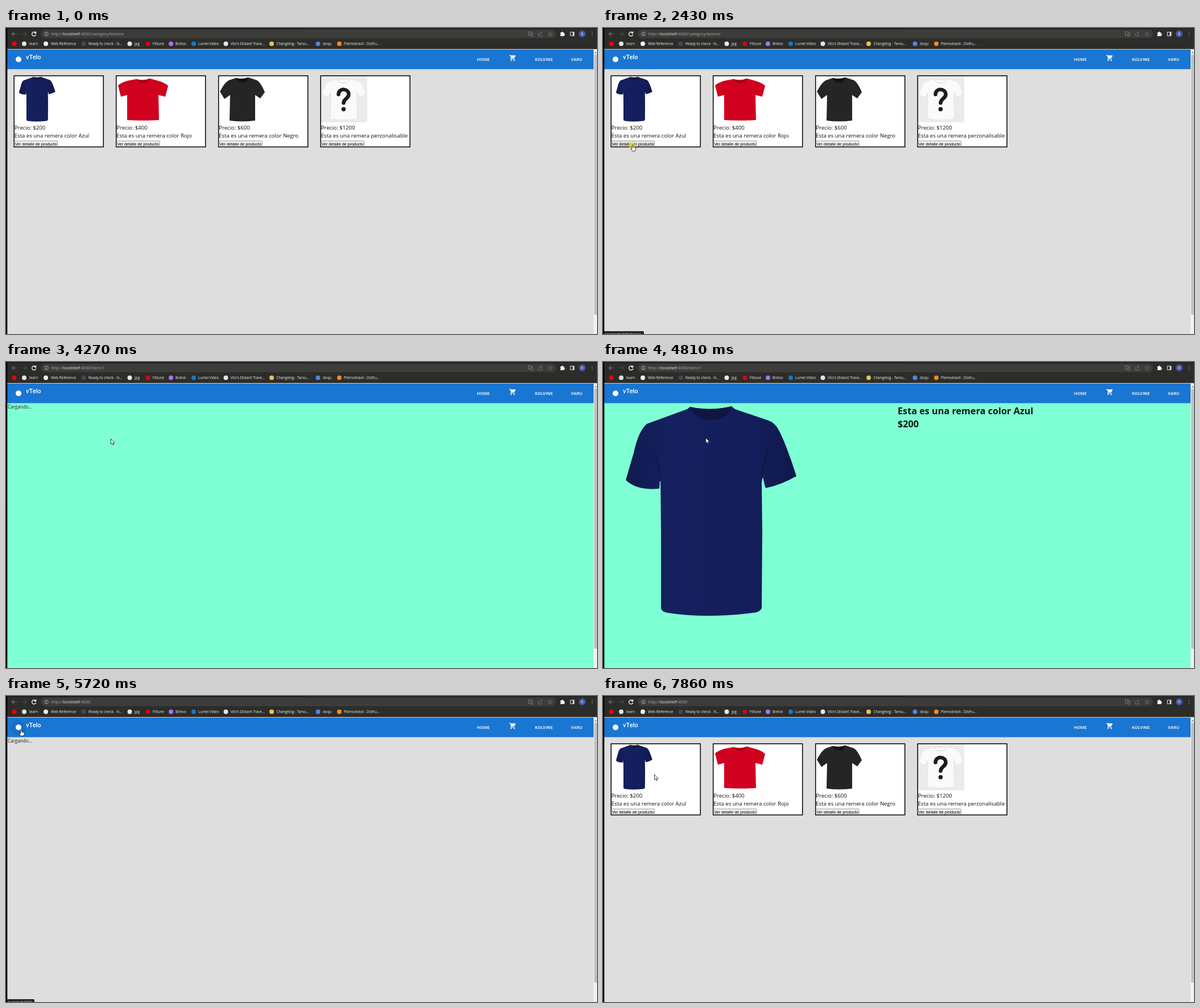
These frames come from a looping animation (1039 by 539 pixels, 8 s). An HTML page:

```html
<!DOCTYPE html>
<html lang="es">
<head>
<meta charset="utf-8">
<title>Tienda</title>
<style>
html, body { margin: 0; width: 100%; height: 100%; overflow: hidden; background: #000; }
svg { display: block; width: 1039px; height: 539px; }
text { font-family: "Open Sans", "Noto Sans", sans-serif; white-space: pre; }
.bar { font-size: 6.3px; fill: #f2f2f2; }
.url { font-size: 7.25px; fill: #a8a8a8; }
.url .host { fill: #f0f0f0; }
.nav { font: 500 7.6px Roboto, sans-serif; letter-spacing: .2px; fill: #fff; }
.brand { font: 500 11px Roboto, sans-serif; fill: #fff; }
.body { font-size: 9.55px; fill: #111; }
.loading { font-size: 8.1px; fill: #222; }
.title { font-size: 16.24px; font-weight: 700; fill: #0b1512; }
.button { font: 7.2px "Liberation Sans", Arial, sans-serif; fill: #000; }
.line { fill: none; stroke-width: 1.1; }
</style>
</head>
<body>
<svg viewBox="0 0 1039 539">
  <defs>
    <linearGradient id="navy" x2="1">
      <stop offset="0" stop-color="#111a50"/><stop offset=".25" stop-color="#15205f"/>
      <stop offset=".75" stop-color="#141e5b"/><stop offset="1" stop-color="#101849"/>
    </linearGradient>
    <g id="blueShirt">
      <path fill="url(#navy)" d="M153 79Q190 87 226 78L232 83L288 102Q302 106 309 120Q321 142 340 201Q312 217 286 222Q283 215 281 200L279 212L280 300L279 434Q276 441 262 442Q180 452 115 442Q101 440 102 432L102 300L101 195L99 223Q60 227 40 208L54 160Q62 122 77 109L148 83Z"/>
      <path fill="#0f1642" d="M153 79Q190 87 226 78Q220 102 190 102Q161 102 153 79Z"/>
      <path d="M91 163Q98 178 101 210M290 150Q283 170 280 205" fill="none" stroke="#0e1545" stroke-width="2"/>
    </g>
  </defs>

  <rect id="page" x="2" y="38" width="1031" height="501"/>
  <g id="shop"></g>
  <g id="detail">
    <use href="#blueShirt"/>
    <text class="title" x="518" y="91.5">Esta es una remera color Azul</text>
    <text class="title" x="518" y="115">$200</text>
  </g>
  <text id="loading" class="loading" x="3" y="82">Cargando...</text>

  <rect x="2" y="38" width="1031" height="34.5" fill="#1976d2"/>
  <circle id="brandHover" cx="22" cy="55" r="13" fill="#000" opacity=".06"/>
  <circle cx="22" cy="55.3" r="5" fill="#fff"/>
  <text class="brand" x="35" y="54.8">vTelo</text>
  <text class="nav" x="828" y="57.6">HOME</text>
  <path fill="#fff" transform="translate(884.3 46.4) scale(.54)" d="M1 2v2h2l3.6 7.6-1.4 2.4c-.7 1.4.3 3 1.8 3h12v-2H7.4l1.1-2H16l1.7-1 4-7.5-1-1H5.2l-1-2zM7 18a2 2 0 100 4 2 2 0 000-4zM17 18a2 2 0 100 4 2 2 0 000-4z"/>
  <text class="nav" x="930" y="57.6">KOLVINE</text>
  <text class="nav" x="993" y="57.6">VARU</text>

  <rect x="1033" y="38" width="6" height="501" fill="#f1f1f1"/>
  <rect x="1034" y="47" width="5" height="458" fill="#c1c1c1"/>
  <path d="M1034.5 44.5h4l-2-2.5z" fill="#777"/>

  <rect width="1039" height="37" fill="#2c2c2a"/>
  <rect width="1039" height="1" fill="#0b0b0b"/>
  <rect x="528" width="511" height="1" fill="#1c1c1c"/>
  <rect y="37" width="1039" height="1" fill="#c9d3de"/>
  <rect x="61" y="3" width="906" height="15" rx="7.5" fill="#3c3c3a"/>
  <g class="line" stroke="#777">
    <path d="M18.5 10.5h-8m3.7-3.7l-3.7 3.7 3.7 3.7"/>
    <path stroke="#4d4d4b" d="M28 10.5h8m-3.7-3.7l3.7 3.7-3.7 3.7"/>
    <path stroke="#fff" stroke-width="1.3" d="M52 8.3A3.6 3.6 0 1 0 52.7 11.5M52.6 6.3V9H49.7"/>
    <circle cx="71" cy="10.5" r="3.4" stroke="#bbb" stroke-width=".8"/>
    <path stroke="#bbb" d="M71 9.9v2.6M71 8.2v1"/>
    <path d="M918.5 6.7h4.5v6h-4.5zM923 8.7h3v5.5h-4"/>
    <path d="M936 9v5h6v-2.5M937.5 11q.5-3 4.5-3m-1.8-2l2.2 2-2.2 2" stroke-width=".9"/>
    <path d="M956.5 6.8l1.1 2.5 2.7.3-2 1.8.6 2.7-2.4-1.4-2.4 1.4.6-2.7-2-1.8 2.7-.3z" stroke-width=".8"/>
    <path d="M992.3 7.2h6.4v6.6h-6.4z" stroke="#ddd"/>
  </g>
  <path d="M974.5 8h2a1.4 1.4 0 0 1 2.8 0h2v2.2a1.4 1.4 0 0 1 0 2.8v1.3h-6.8v-2a1.4 1.4 0 0 0 0-2.6z" fill="#fff"/>
  <path d="M996.3 7h2.5v7h-2.5z" fill="#ddd"/>
  <circle cx="1013" cy="10.3" r="6" fill="#4757ae"/>
  <text x="1013" y="12.6" text-anchor="middle" font-size="6.2" fill="#fff">R</text>
  <path d="M1030.5 7.5v.1m0 2.8v.1m0 2.8v.1" stroke="#aaa" stroke-width="1.3" stroke-linecap="round"/>
  <text class="url" x="79.3" y="13">http://<tspan class="host">toolshelf</tspan>:4000<tspan id="route"></tspan></text>
  <g id="bookmarks"></g>

  <rect width="2.3" height="539" fill="#000"/>
  <g id="status">
    <path id="statusBox" fill="#242424"/>
    <text id="statusText" x="4" y="541.5" font-size="6.3" fill="#ddd"></text>
  </g>

  <circle id="click" r="6.3" fill="#e8dc28" opacity=".65"/>
  <g id="cursor" stroke="#111" stroke-width=".8" stroke-linejoin="round" fill="#fff">
    <path id="arrow" d="M0 0V9.2L2.1 7.3 3.5 10.5 5 9.9 3.6 6.8H6.4Z"/>
    <path id="hand" d="M-1 1Q0-.7 1 1V4.4Q2.2 3.7 2.7 4.9 4 4.3 4.3 5.3 5.6 5 5.5 6.4V8.3L4.3 11.3H-.3L-3 7.7Q-3.2 6.1-1 7.3Z"/>
  </g>
</svg>
<script>
const $ = id => document.getElementById(id);
const show = (id, on) => $(id).setAttribute('display', on ? 'inline' : 'none');

const bookmarks = [
  [14.5, '#f00000'], [32, '#e4e4e4', 41, 'learn'], [70, '#f4f4f4', 79, 'Web Reference'],
  [136.5, '#45455c', 145, 'Ready to check - N...'], [217.5, '#e8e8e8', 226, 'jpg'],
  [249.5, '#d00812', 258, 'Filtune'], [290, '#a970ff', 298, 'Brelvo'],
  [330, '#1479c9', 338, 'Lumel Video'], [386.5, '#dfe4f5', 395, "Vilo's Distant Trave..."],
  [467, '#e8c54a', 475.5, 'Changelog - Tarvu...'], [548.5, '#5383e8', 557, 'doqu'],
  [586, '#f18b21', 594, 'Plemodravil - Disfru...']
];
$('bookmarks').innerHTML = bookmarks.map(([cx, color, x, label]) =>
  `<circle cx="${cx}" cy="27.7" r="4" fill="${color}"/>` +
  (label ? `<text class="bar" x="${x}" y="29.9">${label}</text>` : '')).join('');

// Shirt drawings are relative to the left edge of their card.
const products = [
  [13.5, 200, 'color Azul', '<use href="#blueShirt" transform="translate(.7 69.3) scale(.2135)"/>'],
  [193, 400, 'color Rojo', `<path fill="#d0021f" d="M36 90Q48 94 60 89L78 94Q87 97 92 102L87 121 75 118 76 162Q48 164 20 162V118L9 121 4 101Q10 96 20 93Z"/>
    <path fill="#a50018" d="M36 90Q48 94 60 89Q56 97 48 97T36 90Z"/>`],
  [373, 600, 'color Negro', `<path fill="#252525" d="M31 88Q42 91 53 87L68 92Q75 96 82 113L74 124 65 118V163Q42 166 20 163L21 118 11 125 3 112Q12 95 19 92Z"/>
    <path fill="#111" d="M31 88Q42 91 53 87Q51 96 42 96T31 88Z"/>`],
  [552.5, 1200, 'perzonalisable', `<path fill="#ebebeb" d="M1.5 85H82.5V166H1.5Z"/>
    <path fill="#fafafa" stroke="#ddd" stroke-width=".6" d="M29 89Q41 94 53 89L68 94Q76 97 80 117L70 122 64 113 65 160Q41 164 18 160L19 113 13 122 3 117Q7 98 14 95Z"/>
    <path fill="none" stroke="#d0d0d0" d="M29 89Q32 97 41 97T53 89"/>
    <path fill="none" stroke="#1c1c1c" stroke-width="6.5" stroke-linecap="round" d="M32 117C32 105 50 106 50 117C50 125 41 124 41 132"/>
    <circle cx="41" cy="143" r="3.8" fill="#1c1c1c"/>`]
];
$('shop').innerHTML = products.map(([x, price, kind, shirt], i) => `
  <g transform="translate(${x})">
    <rect x=".7" y="84.2" width="157" height="125.3" fill="#fff" stroke="#000" stroke-width="1.5"/>
    ${shirt}
    <text class="body" x="1.3" y="179.3">Precio: $${price}</text>
    <text class="body" x="1.3" y="192.8">Esta es una remera ${kind}</text>
    <rect id="button${i}" x="1.4" y="198.9" width="75.8" height="9.8" rx="1" fill="#efefef" stroke="#767676" stroke-width=".7"/>
    <text class="button" x="2.2" y="206.5">Ver detalle de producto</text>
  </g>`).join('');

const STEP = 69.5;
const origin = [997, 524];
// start, end, destination of the pointer
const moves = [
  [510, 790, 494, 330], [990, 1680, 54, 174], [1750, 1750, 53, 180], [1820, 2230, 52, 205.5],
  [2830, 3120, 221, 163], [3390, 3530, 222, 164], [4130, 4270, 184.5, 135.5],
  [4810, 5510, 26.5, 59], [6470, 7170, 90.5, 138.5]
];

function pointerAt(t) {
  let [x, y] = origin;
  for (const [start, end, toX, toY] of moves) {
    if (t < start) break;
    const count = Math.round((end - start) / STEP) + 1;
    const u = Math.min(1, (Math.floor((t - start) / STEP) + 1) / count);
    const eased = u * u * (3 - 2 * u);
    x += (toX - x) * eased;
    y += (toY - y) * eased;
  }
  return [x, y];
}

function draw(t) {
  const within = (a, b) => t >= a && t < b;
  const item = within(2500, 5720);
  const detail = within(4540, 5720);
  const shop = t < 2500 || t >= 7580;
  $('page').setAttribute('fill', item ? '#7fffd4' : '#dedede');
  $('route').textContent = item ? '/item/1' : t < 2500 ? '/category/kolvine' : '';
  show('shop', shop);
  show('detail', detail);
  show('loading', !shop && !detail);

  const itemStatus = within(2430, 2830);
  show('status', itemStatus || within(5720, 6540));
  $('statusBox').setAttribute('d', `M2 534H${itemStatus ? 70 : 48}q2 0 2 2v3H2z`);
  $('statusText').textContent = 'toolshelf:4000' + (itemStatus ? '/item/1' : '');

  const [x, y] = pointerAt(t);
  const onButton = within(2090, 2500);
  const onBrand = within(5440, 6610);
  $('button0').setAttribute('fill', onButton ? '#e5e5e5' : '#efefef');
  show('brandHover', onBrand);
  show('cursor', t >= 510);
  show('arrow', !onButton && !onBrand);
  show('hand', onButton || onBrand);
  $('cursor').setAttribute('transform', `translate(${x} ${y})`);
  show('click', within(2430, 2500) || within(5650, 5720));
  $('click').setAttribute('cx', x - .5);
  $('click').setAttribute('cy', y + 1.5);
}

const began = performance.now();
function tick() {
  draw((performance.now() - began) % 8000);
  requestAnimationFrame(tick);
}
tick();
</script>
</body>
</html>
```
